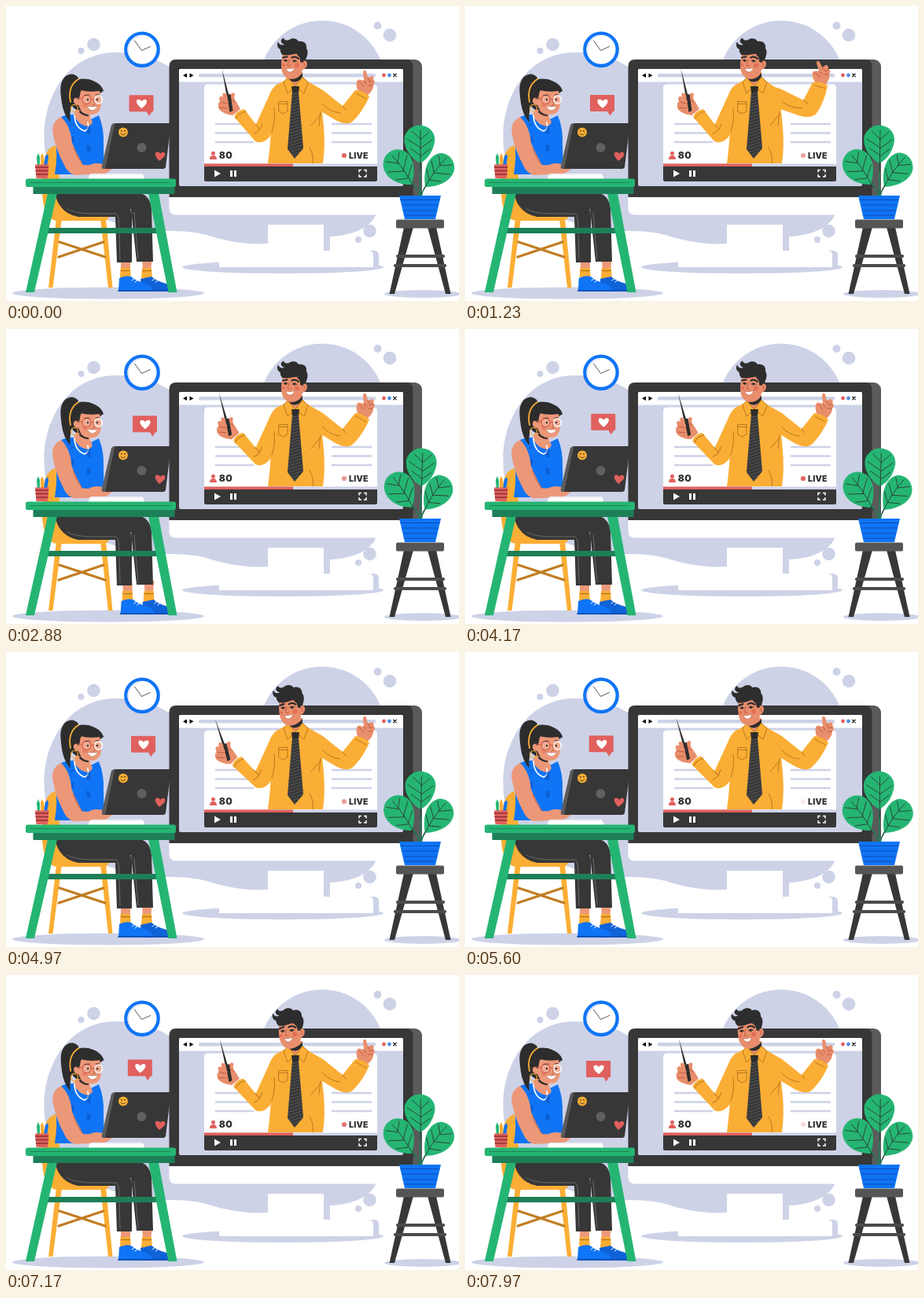
These frames come from a looping animation (576x375 px, 8000 ms). An HTML page:

```html
<!DOCTYPE html>
<html lang="en">
<head>
<meta charset="utf-8">
<title>Live class</title>
<style>
html, body { margin: 0; width: 100%; height: 100%; overflow: hidden; background: #fff; }
svg { display: block; width: 100%; height: 100%; }
text { font-family: Inter, "Open Sans", sans-serif; font-weight: 900; fill: #333; letter-spacing: .25px; }
.line { fill: none; stroke-linecap: round; stroke-linejoin: round; }
.lav { fill: #cdd2e7; }
.dark { fill: #373737; }
.ink { fill: #2d2d2d; }
.skin { fill: #ec9878; }
.tan { fill: #e98e6c; }
.gold { fill: #fbae35; }
.blue { fill: #0f74f5; }
.red { fill: #e0605d; }
.green { fill: #25b573; }
.pine { fill: #1d7f58; }
.white { fill: #fff; }
.seam { stroke: #b9791f; stroke-width: 1; }
.thin { stroke: #2d2d2d; stroke-width: .8; }
.fold { stroke: #0a4db5; stroke-width: 1; }
.crease { stroke: #b8593f; stroke-width: .9; }
</style>
</head>
<body>
<svg viewBox="0 0 576 375">
  <defs>
    <clipPath id="tieClip"><path d="M363 110H372L378 181 367 194 358 182Z"/></clipPath>
  </defs>

  <!-- backdrop -->
  <g class="lav">
    <path d="M49 178C44 118 78 59 140 59C190 60 200 75 230 90H470V266C463 282 440 292 412 293L404 302H333C305 304 280 299 255 291C240 287 225 286 205 286C140 284 54 258 49 178Z"/>
    <circle cx="402" cy="98.500" r="80"/>
    <circle cx="111.500" cy="49" r="8.300"/><circle cx="95.500" cy="57" r="4"/>
    <circle cx="472.500" cy="25" r="5"/><circle cx="488" cy="37" r="8.300"/>
    <circle cx="462.500" cy="286" r="8.300"/><circle cx="448" cy="297" r="4"/>
    <ellipse cx="130" cy="365" rx="122" ry="7.500"/>
    <ellipse cx="352" cy="332" rx="128" ry="8"/>
    <ellipse cx="530" cy="366" rx="49" ry="5"/>
  </g>

  <!-- clock -->
  <circle class="white" cx="173" cy="55.300" r="20.700" stroke="#0f74f5" stroke-width="4.300"/>
  <path class="line" d="M156 61A18 18 0 0 1 171 38" stroke="#dfe2f0" stroke-width="1.500"/>
  <path class="line thin" d="M163.500 44 172.500 56.500 183.500 51.500"/>

  <!-- monitor -->
  <path class="lav" d="M403 262H412V311H468Q474 311 474 317V332H403Z"/>
  <path class="white" d="M333 262H404V311H461Q467 311 467 317V332H271V317Q271 311 277 311H333Z"/>
  <rect class="lav" x="333" y="264" width="71" height="14"/>
  <rect x="240" y="68" width="289" height="178" rx="9" fill="#5b5b5b"/>
  <path d="M505 160H529V262Q529 266 522 266H505Z" fill="#5b5b5b"/>
  <path class="white" d="M207.500 242H517V257Q517 265.500 508 265.500H216Q207.500 265.500 207.500 257Z"/>
  <path class="dark" d="M216 68H509Q517.500 68 517.500 77V243H207.500V77Q207.500 68 216 68Z"/>
  <rect class="lav" x="220" y="80" width="285" height="149" rx="2"/>
  <path class="white" d="M222 80H503Q505 80 505 82V96.500H220V82Q220 80 222 80Z"/>
  <path d="M230 85.500V91L225 88.200ZM233.500 85.500V91L238.500 88.200Z"/>
  <path class="line" d="M247 88.200H468" stroke="#cdd2e7" stroke-width="4.500"/>
  <circle class="red" cx="480.500" cy="88" r="2.400"/><circle cx="487.500" cy="88" r="2.400" fill="#4d8fe0"/>
  <path class="line" d="M492.800 86.300 496.200 89.700M496.200 86.300 492.800 89.700" stroke="#222" stroke-width="1.300"/>
  <path class="white" d="M257 99.500H467Q472 99.500 472 104.500V201H252V104.500Q252 99.500 257 99.500Z"/>
  <path class="line" d="M267 150H314M267 161.500H314M267 173H314M415 150H464M415 161.500H464M415 173H464" stroke="#cdd2e7" stroke-width="2.600"/>
  <path class="red" d="M259 195Q259 190 263.500 190Q268 190 268 195Z"/><circle class="red" cx="263.500" cy="187.300" r="2.500"/>
  <text x="270.800" y="194.300" font-size="12">80</text>
  <circle id="rec" class="red" cx="430" cy="190" r="3.100"/>
  <text x="436" y="193.800" font-size="10.500">LIVE</text>

  <!-- teacher -->
  <g id="armR">
    <path class="tan" d="M447 107C444 98 446 92 451 94L455 95 454 84Q455 80 458 83L460 91 465 89Q469 90 467 94Q471 97 467 101C467 108 461 112 457 116Z"/>
    <path class="line crease" d="M455 95 458 99M460 91 463 97 467 95M461 101 466 101M449 96 455 102"/>
    <path class="gold" d="M382 95L403 107 428 127 444 107Q454 107 462 115C456 129 447 142 439 148C425 154 410 137 392 130Z"/>
    <path class="line seam" d="M445 111 458 118M428 127 432 132"/>
    <path class="line seam" d="M402 124Q412 135 425 136"/>
  </g>
  <path class="gold" d="M347 98Q338 103 334 115L318 150 317 172C328 175 335 169 340 158Z"/>
  <path class="gold" d="M353 95 341 103C337 120 339 160 333 200H403C408 168 402 135 398 106L381 94Z"/>
  <path class="line seam" d="M341 130Q343 145 338 160M400 135 398 152M388 152 400 138M386 180Q392 190 390 200"/>
  <path class="line seam" d="M347 121.500H358V134L352.500 137 347 134ZM347 124.500H358"/>
  <path class="tan" d="M359 84H377V94L368 104 359 95Z"/>
  <path d="M360 91Q369 95 377 85V91Q369 100 360 94Z" fill="#2d2d2d"/>
  <path class="gold seam" d="M358 91 353 97 358 111 368 102ZM377 90 384 97 379 111 368 102Z"/>
  <path class="ink" d="M363 102H373L372 111H364Z"/>
  <path class="dark" d="M364 110H372L378 181 367 194 358 182Z"/>
  <g id="stripes" clip-path="url(#tieClip)" stroke="#5a5a5a" stroke-width=".9"></g>
  <g id="armL">
    <path class="gold" d="M290 141Q293 133 303 131L318 151Q332 144 336 158C335 171 325 176 317 172Z"/>
    <path class="line seam" d="M292.500 143Q296 136 305 134M317 150 322 156M315 162Q323 160 326 150"/>
    <path class="ink" d="M274.500 79.500 288 131 284 134.500Z"/>
    <path class="tan" d="M272 122 271 117Q273 113 276 116Q274 109 279 111L284 115Q288 108 291 112Q289 118 293 122L298 131 288 139C280 138 271 134 270 129Q269 124 272 122Z"/>
    <path class="ink" d="M281 113 285.500 112 288.500 133 284.500 135Z"/>
    <path class="tan" d="M272 116Q278 114 283 121L282 124 272 122ZM270 123Q276 121 283 126L281 130 270 129Z"/>
    <path class="line crease" d="M273 122 281 124M272 129 281 130M286 118 291 122"/>
  </g>
  <g id="head">
    <path class="ink" d="M353 64C350 61 348 57 349 55C345 54 344 49 346 45.500C348 50 351 50 354 49C348 47 349 42 353 40.500C354 44 357 44 360 43C364 40 370 41 372 45C379 44 383 48 382 54C385 58 383 64 381 68L379 78 373 78Z"/>
    <path class="tan" d="M352 62C360 64 367 60 373 61L375 71Q382 67 383 73Q383 79 377 81C375 90 369 93 362 93C354 92 350 85 350 76Q350 67 352 62Z"/>
    <path class="ink" d="M372 58Q379 60 378 72L374 71Q375 65 370 62Z"/>
    <path class="line" d="M352 65.500 357.500 64.500M363.500 65.500Q368 63 372 67" stroke="#2d2d2d" stroke-width="2.200"/>
    <path class="line" d="M353 69Q355 67 358 69.500M364 70Q367 67.500 370 70.500" stroke="#2d2d2d" stroke-width="1"/>
    <circle class="ink" cx="355.500" cy="69.500" r="1.500"/><circle class="ink" cx="366.800" cy="70" r="1.600"/>
    <path class="line crease" d="M360.500 68 358 75.500Q360 77.500 362 75.500M378 72Q381 73 379 77"/>
    <path class="white" d="M355.500 79Q361 80.500 367 78.500Q365 84.500 360 84Q357 83 355.500 79Z" stroke="#b8593f" stroke-width=".6"/>
    <circle cx="370" cy="75.500" r="3" fill="#dd5a48" opacity=".6"/><circle cx="352.800" cy="75" r="2" fill="#dd5a48" opacity=".6"/>
  </g>

  <!-- player bar -->
  <rect class="lav" x="252" y="200.500" width="220" height="4"/>
  <rect class="red" x="252" y="200.500" width="113" height="3.600"/>
  <path class="dark" d="M252 204H472V221Q472 223 470 223H254Q252 223 252 221Z"/>
  <path class="white" d="M265 208.500V217.500L273 213ZM285 209H288V217H285ZM290 209H293V217H290Z"/>
  <path d="M452 208.500H449V211.500M455 208.500H458V211.500M449 214V217H452M458 214V217H455" fill="none" stroke="#fff" stroke-width="1.500"/>

  <!-- heart bubble -->
  <g id="bubble">
    <path class="red" d="M1 0H30Q31 0 31 1V20Q31 21 30 21H29L25.500 26.500 22 21H1Q0 21 0 20V1Q0 0 1 0Z"/>
    <path class="white" d="M16 17C8 11 8 5.500 12 5.500Q15 5.500 16 8Q17 5.500 20 5.500C24 5.500 24 11 16 17Z"/>
  </g>

  <!-- chair -->
  <path class="gold" d="M63 177C46 181 45 210 46 238Q48 273 66 273H124Q132 273 132 262V236H70Z"/>
  <path class="gold" d="M64 270H71L59.500 358H54ZM120 270H127L135.500 358H130Z"/>
  <path class="line" d="M68 300 126 319M67 319 124 300" stroke="#c27d22" stroke-width="3.200"/>

  <!-- student: legs -->
  <g id="feet">
    <path class="skin" d="M173 320H186L184 336H174Z"/>
    <path class="gold" d="M173 333H185L186 347H172Z"/>
    <path d="M173 336.500H185" stroke="#b9791f" stroke-width="1.500"/>
    <path d="M171 347Q179 345 185 344Q192 350 204 353Q212 356 211.500 362.500H172Z" fill="#0f62d8"/>
    <path class="skin" d="M146 320H158V336H146Z"/>
    <path class="gold" d="M145.500 333H158L159 347H145Z"/>
    <path d="M146 336.500H158" stroke="#b9791f" stroke-width="1.500"/>
    <path class="blue" d="M144 346Q152 342 159 344Q166 350 178 353Q187 357 186.500 362.500H143Z"/>
    <path class="line" d="M143 361.800H186M173 361.800H211" stroke="#0a4db5" stroke-width="1.700"/>
    <path class="line" d="M160 349 164 346M164 351 168 348M186 349 190 346M190 351 194 348" stroke="#fff" stroke-width="1"/>
  </g>
  <path class="dark" d="M62 238H172Q184 243 185 258L187 325H166L159 258H150V268H92Q68 264 62 238Z"/>
  <path class="dark" d="M120 243Q158 242 160 266V326H141L139 268H90Z"/>
  <path class="line" d="M78 258Q88 264 110 264H140Q143 266 143.500 274L145 322M163 262 168 322" stroke="#777" stroke-width=".8"/>

  <!-- student: body -->
  <path class="blue" d="M70 141Q80 136 92 139L104 146 118 139Q125 156 124 176L125 214H62Q66 190 63 172Z"/>
  <path class="skin" d="M90 128H106L107 142Q114 150 103 153Q92 151 86 139Z"/>
  <path d="M94 132Q99 138 105 138V140Q98 140 93 135Z" fill="#2d2d2d"/>
  <path class="line" d="M87 139Q88 155 100 159Q106 157 104 148" stroke="#fff" stroke-width="1.700"/>
  <path id="folds" class="line fold"/>
  <path class="skin" d="M106 202C118 197 128 202 135 207L128 212H101Z"/>
  <g id="arm">
    <path class="skin" d="M70 141C60 146 58 154 60 164Q64 184 73 200Q78 213 88 215L125 213Q131 211 134 207L122 203 98 202Q90 188 84 174Q82 152 70 141Z"/>
    <path class="line crease" d="M86 180Q91 194 98 202"/>
  </g>
  <g id="girl">
    <path class="ink" d="M92 91Q85 83 76 89C66 98 70 113 71 123Q73 138 82 148Q80 137 84 126Z"/>
    <path class="ink" d="M84 98Q92 91 104 93Q121 97 124 108L118 112 103 110 96 132Q86 134 83 124Q77 109 84 98Z"/>
    <path class="skin" d="M95 107Q105 110 119 108L121 119C122 132 117 139 107 138Q96 137 92 126Q85 125 86 119Q88 114 93 119Z"/>
    <path class="ink" d="M91 119Q93 110 97 106Q110 104 124 108Q119 97 104 93Q90 96 88 112Z"/>
    <path class="line" d="M92 93Q78 102 82 122" stroke="#fbae35" stroke-width="1.800"/>
    <circle cx="87" cy="130" r="4.500" fill="none" stroke="#fbae35" stroke-width="1.200"/>
    <g fill="#fff" fill-opacity=".2" stroke-width="1.300">
      <circle cx="102.500" cy="119" r="5.600" stroke="#d5604c"/><circle cx="117.500" cy="119" r="5" stroke="#fff"/>
    </g>
    <path class="line" d="M108 118.500 112.500 118M97 118 91 117" stroke="#d5604c"/>
    <path class="line thin" d="M100 113.500 106 113M114 113 118 112.500"/>
    <circle class="ink" cx="104" cy="119" r="1.200"/><circle class="ink" cx="116" cy="119" r="1.200"/>
    <path class="line crease" d="M111 119 113 125 110 126"/>
    <path class="white" d="M103 127Q110 129 117 127Q114 133 109 133Q105 132 103 127Z" stroke="#b8593f" stroke-width=".6"/>
    <circle cx="100" cy="126" r="2.600" fill="#e4684f" opacity=".5"/>
  </g>

  <!-- laptop -->
  <path d="M137 149H141L128 207H123Q121 206 122 203L134 151Z" fill="#5b5b5b"/>
  <path class="dark" d="M140 149H208Q210 149 209.500 152L203 205Q202 207 200 207H126L138 151Z"/>
  <circle class="gold" cx="149" cy="160.500" r="6"/>
  <path class="line thin" d="M146 162Q149 166 152 162"/><circle cx="147" cy="158.800" r=".8"/><circle cx="151" cy="158.800" r=".8"/>
  <circle cx="172.500" cy="180" r="6" fill="#606060"/>
  <path class="red" d="M195 197C188 190 189 185.500 192.500 185.500Q195.500 185.500 196 188Q198 185 201 186C205 189 200 193 195 197Z"/>

  <!-- desk -->
  <path class="white" d="M109 213H172Q176 214 176 220H105Q105 214 109 213Z"/>
  <path class="line" d="M109 214H172" stroke="#dfe2f0"/>
  <path d="M40 204 39 192 41 187 43 192V204Z" fill="#25b573"/>
  <path d="M44 204V191L46 187 48 191V204Z" fill="#fbae35"/>
  <path d="M48 204 50 191 53 188 54 192 52 204Z" fill="#0f74f5"/>
  <path class="red" d="M37 201.500H54.500L53 219H38.500Z"/>
  <path d="M37 205H54M37.500 209.500H54M38 214H53.500" stroke="#8c2f33" stroke-width="1.300"/>
  <rect class="pine" x="53" y="282" width="145" height="7"/>
  <path class="green" d="M53 238H65L36 364H25ZM181 238H194L217.500 364H206.500Z"/>
  <rect class="pine" x="34.500" y="229" width="180" height="10" rx="1"/>
  <rect class="green" x="25" y="219.500" width="191" height="10.500" rx="2.500"/>
  <path class="line" d="M31 224.500H209" stroke="#1d7f58" stroke-width=".9"/>

  <!-- plant -->
  <g id="leafL">
    <path class="line" d="M511 220Q524 230 526 243" stroke="#1d7f58" stroke-width="1.500"/>
    <path class="green" d="M516 227C499 228 480 219 479.500 201C480 187 493 180 503 183C520 188 521 209 516 227Z"/>
    <path class="line thin" d="M491 190Q508 209 519 231M498 199 500 186M505 209 510 190M511 218 516 202M499 200 483 198M506 210 486 211M511 219 496 221"/>
  </g>
  <g id="leafR">
    <path class="line" d="M540 222Q530 230 528 243" stroke="#1d7f58" stroke-width="1.500"/>
    <path class="green" d="M533 230C530 209 536 190 552 187C564 187 571 197 570 208C567 223 549 230 533 230Z"/>
    <path class="line thin" d="M560 193Q543 210 531 234M552 202 550 190M544 211 541 197M538 220 535 207M552 203 567 202M544 212 564 214M538 221 553 223"/>
  </g>
  <g id="leafT">
    <path class="line" d="M527 190Q526 220 527 243" stroke="#1d7f58" stroke-width="1.500"/>
    <path class="green" d="M527 200C514 194 504 179 507 165C511 155 521 150 529 152C542 154 548 165 544 177C541 188 535 195 527 200Z"/>
    <path class="line thin" d="M527 158V210M527 169 516 159M527 180 510 169M527 190 514 181M527 170 538 160M527 181 542 170M527 191 539 182"/>
  </g>
  <path class="blue" d="M500 241H553L546 271H507Z"/>
  <path class="line fold" d="M502 246.500H551M504 253H549M506 260H547M508 266H545"/>
  <path class="dark" d="M506 281H518L494 366H487.500ZM536 281H547L565.500 366H559Z"/>
  <path d="M498 318H556M495 330H558" stroke="#4b4b4b" stroke-width="4.200" stroke-linecap="round"/>
  <rect x="496" y="271.500" width="61" height="11" rx="2" fill="#555"/>
</svg>
<script>
const $ = id => document.getElementById(id);
const LOOP = 8000, TAU = Math.PI * 2;

// static repeats
let stripes = '', folds = '';
for (let y = 112; y < 204; y += 4) stripes += `<path d="M354 ${y}L382 ${y - 9}"/>`;
for (let i = 0; i < 18; i++) {
  const x = 86 + (i * 17) % 34, y = 150 + (i * 11) % 46;
  folds += `M${x} ${y}l${i % 2 ? 4 : -4} 1.5`;
}
$('stripes').innerHTML = stripes;
$('folds').setAttribute('d', folds);

// eased value between [time, value] keys
function key(t, keys) {
  let [t0, v0] = keys[0];
  for (const [t1, v1] of keys) {
    if (t < t1) {
      const u = Math.max(0, (t - t0) / (t1 - t0));
      return v0 + (v1 - v0) * u * u * (3 - 2 * u);
    }
    [t0, v0] = [t1, v1];
  }
  return v0;
}
const wave = (t, period, peak = 0) => Math.cos(TAU * (t - peak) / period);
const move = (id, x, y) => $(id).setAttribute('transform', `translate(${x} ${y})`);
const turn = (id, a, x, y) => $(id).setAttribute('transform', `rotate(${a} ${x} ${y})`);

const raise = [[150, 0], [950, -12], [1400, -12], [2350, 0]];
const point = [[1300, 0], [2500, -2.4], [4170, -2.4], [4900, -6], [5100, -6], [6200, -2], [7970, -1.7]];
const tilt = [[1720, 0], [2100, -1.2], [2520, 0], [4230, 0], [4850, -7.5], [7570, -8.2]];
const step = [[0, 0], [1230, .8], [2700, 2.6], [3000, 2.6], [4100, 0]];
const elbow = [[900, 0], [2600, 1.2], [3400, .5], [4170, .5], [4900, 1.2], [5880, 0]];
const nod = [[6770, 0], [7300, .7], [8000, 0]];
const ORBIT = 10500;

function draw(t) {
  move('bubble', 157.5 + 3.5 * wave(t, ORBIT, 3100), 109.8 - 3.5 * wave(t, ORBIT, 3100 + ORBIT / 4));
  $('rec').setAttribute('opacity', .5 + .47 * wave(t, 1048, -52));
  turn('armR', key(t, raise), 395, 112);
  turn('armL', key(t, point), 320, 165);
  turn('head', key(t, tilt), 368, 95);
  move('feet', key(t, step), 0);
  turn('arm', key(t, elbow), 72, 146);
  turn('girl', key(t, nod), 99, 138);
  const sway = (1 - wave(t, 6500)) / 2;
  turn('leafT', 2 * sway, 527, 241);
  turn('leafL', 1.8 * sway, 527, 241);
  turn('leafR', -3 * sway, 527, 241);
}

const start = performance.now();
function tick() {
  draw((performance.now() - start) % LOOP);
  requestAnimationFrame(tick);
}
tick();
</script>
</body>
</html>
```
